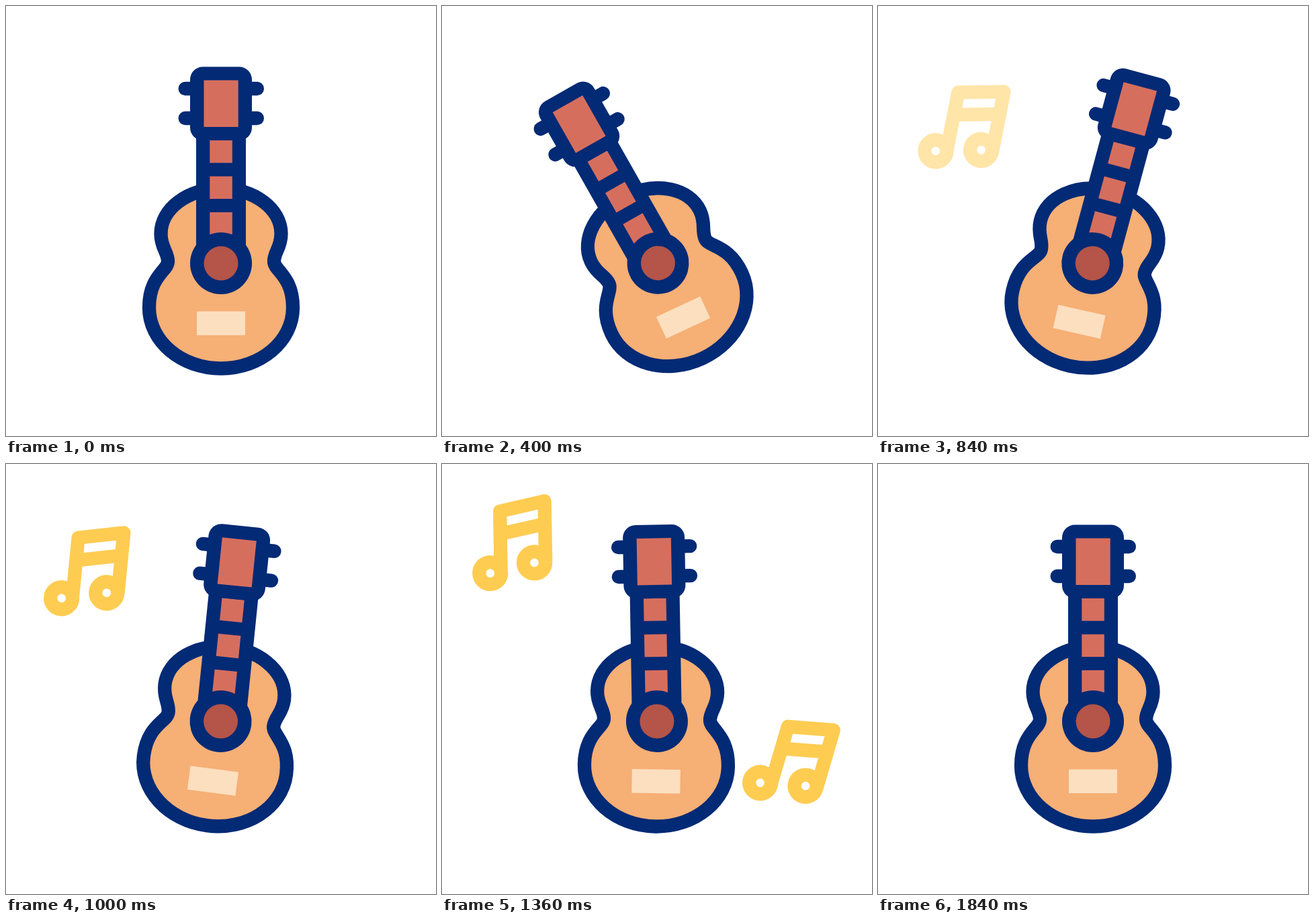
These frames come from a looping animation (640x640 px, 2000 ms). An HTML page with a canvas:

```html
<!DOCTYPE html>
<html lang="en">
<head>
<meta charset="utf-8">
<title>Guitar</title>
<style>
  html, body { margin: 0; width: 100%; height: 100%; overflow: hidden; background: #fff; }
  canvas { display: block; width: 100vmin; height: 100vmin; }
</style>
</head>
<body>
<canvas id="stage" width="640" height="640"></canvas>
<script>
const ctx = document.getElementById('stage').getContext('2d');
const LOOP = 2000, STEP = 40;
const NAVY = '#032a75', ORANGE = '#f6af75', RED = '#d66e5e';
const DARK_RED = '#b55448', CREAM = '#fcdfbf', YELLOW = '#ffcc52';
const RAD = Math.PI / 180;

// Swings between extremes: [time, degrees, optional time warp]
const bodySwing = [[0, 0], [520, -30, 1.2], [800, 13], [1220, 1], [1840, 0]];
const neckSwing = [[0, 0], [530, -36.5, 1.2], [816, 15.3], [1200, -5], [1450, 0.6], [1680, 0]];

// Paths of the notes: [time, x, y, degrees]
const notes = [
  { path: [[760, 132, 189, 14], [840, 127, 178, 11.1], [1120, 114.5, 144, 1.7],
           [1200, 109, 137, 0], [1360, 104, 117, -1], [1520, 107, 97, 4]],
    fade: [765, 915, 1400, 1520] },
  { path: [[1060, 526, 506, 20], [1200, 512.8, 476, 13.6],
           [1520, 524.5, 410, 18.8], [1840, 522, 380, 10]],
    fade: [1050, 1180, 1700, 1840] }
];

const clamp = v => Math.min(1, Math.max(0, v));

function swing(keys, t) {
  for (let i = 1; i < keys.length; i++) {
    const [t0, a] = keys[i - 1], [t1, b, warp = 1] = keys[i];
    if (t < t1) {
      const u = ((t - t0) / (t1 - t0)) ** warp;
      return a + (b - a) * (1 - Math.cos(Math.PI * u)) / 2;
    }
  }
  return keys[keys.length - 1][1];
}

// Smooth curve through all keys, one value per column
function follow(keys, t) {
  const last = keys.length - 1;
  let i = 0;
  while (i < last - 1 && t >= keys[i + 1][0]) i++;
  const p = keys[i], q = keys[i + 1];
  const before = keys[Math.max(0, i - 1)], after = keys[Math.min(last, i + 2)];
  const d = q[0] - p[0], u = clamp((t - p[0]) / d), w = 1 - u;
  return [1, 2, 3].map(c => {
    const m0 = (q[c] - before[c]) / (q[0] - before[0]) * d;
    const m1 = (after[c] - p[c]) / (after[0] - p[0]) * d;
    return p[c] * (1 + 2 * u) * w * w + m0 * u * w * w
         + q[c] * u * u * (3 - 2 * u) - m1 * u * u * w;
  });
}

function rotate(deg, x, y) {
  ctx.translate(x, y);
  ctx.rotate(deg * RAD);
  ctx.translate(-x, -y);
}

function box(color, x, y, w, h, r = 0) {
  ctx.fillStyle = color;
  ctx.beginPath();
  ctx.roundRect(x, y, w, h, r);
  ctx.fill();
}

function disc(color, x, y, r) {
  ctx.fillStyle = color;
  ctx.beginPath();
  ctx.arc(x, y, r, 0, 2 * Math.PI);
  ctx.fill();
}

const shell = new Path2D(
  'M320 272C270 272 230.5 302 230.5 339C230.5 360 241 366 241 380' +
  'C241 394 213 402 213 449C213 499 261 539.5 320 539.5' +
  'C379 539.5 427 499 427 449C427 402 399 394 399 380' +
  'C399 366 409.5 360 409.5 339C409.5 302 370 272 320 272Z');

function drawBody() {
  ctx.fillStyle = ORANGE;
  ctx.fill(shell);
  ctx.strokeStyle = NAVY;
  ctx.lineWidth = 20.3;
  ctx.stroke(shell);
  box(CREAM, 284, 454.5, 72, 35.5);
}

function drawNeck() {
  box(NAVY, 283, 180, 74, 190);
  for (const y of [200, 253.5, 307]) box(RED, 303.3, y, 33.5, 33.5);
  for (const y of [123, 167]) box(NAVY, 256.5, y - 10.2, 127.5, 20.4, 10.2);
  box(NAVY, 274, 90.5, 92, 109.5, 19);
  box(RED, 294.5, 110.5, 51.2, 69.5);
  disc(NAVY, 320, 383, 46);
  disc(DARK_RED, 320, 383, 25.5);
}

const noteShape = new Path2D(
  'M-17 45V-47L49.7 -61V30.5M-17 -13.1L49.7 -27.1');
for (const [x, y] of [[-33, 45], [33, 30.5]]) {
  noteShape.moveTo(x + 16.5, y);
  noteShape.arc(x, y, 16.5, 0, 2 * Math.PI);
}

function drawNote({ path, fade: [in0, in1, out0, out1] }, t) {
  const alpha = clamp((t - in0) / (in1 - in0)) * clamp((out1 - t) / (out1 - out0));
  if (!alpha) return;
  const [x, y, deg] = follow(path, t);
  ctx.save();
  ctx.globalAlpha = alpha;
  ctx.translate(x, y);
  ctx.rotate(deg * RAD);
  ctx.strokeStyle = YELLOW;
  ctx.lineWidth = 20.3;
  ctx.lineJoin = 'round';
  ctx.stroke(noteShape);
  ctx.restore();
}

function draw(t) {
  ctx.fillStyle = '#fff';
  ctx.fillRect(0, 0, 640, 640);
  const body = swing(bodySwing, t), neck = swing(neckSwing, t);
  ctx.save();
  rotate(body, 320, 379.5);
  drawBody();
  rotate(neck - body, 320, 383);
  drawNeck();
  ctx.restore();
  for (const note of notes) drawNote(note, t);
}

const start = performance.now();
function tick() {
  const t = (performance.now() - start) % LOOP;
  draw(Math.floor(t / STEP) * STEP);
  requestAnimationFrame(tick);
}
tick();
</script>
</body>
</html>
```
